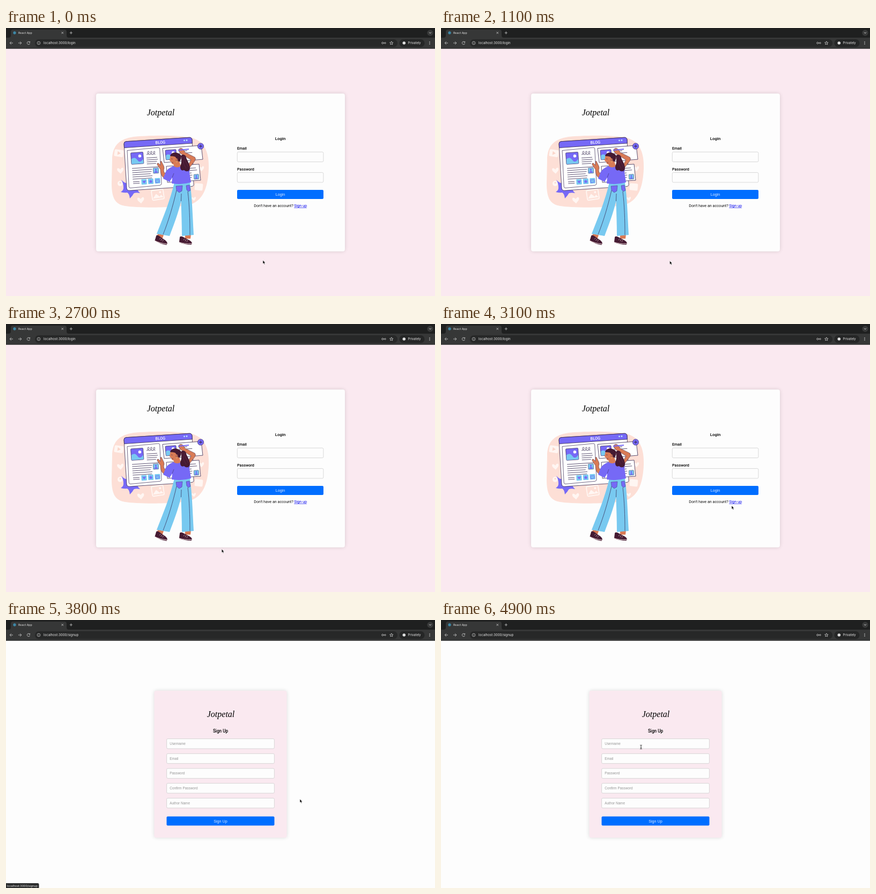
Write an HTML page with a canvas that moves like this. It is 800 px wide and 500 px high and loops after 5000 ms.

```html
<!DOCTYPE html>
<html lang="en">
<head>
<meta charset="utf-8">
<title>Login and sign up</title>
<style>
html, body { margin: 0; width: 100%; height: 100%; overflow: hidden; background: #fdfdfd; }
canvas { display: block; width: 800px; height: 500px; }
</style>
</head>
<body>
<canvas id="stage"></canvas>
<script>
const LOOP = 5000, STEP = 100, SIGNUP_AT = 3800;
const BRAND = 'Jotpetal';
const UI = 'Inter, "Open Sans", sans-serif';
const BODY = 'Roboto, sans-serif';
const FIELD = '"Liberation Sans", Arial, sans-serif';
const SCRIPT = '"Liberation Serif", serif';
const PINK = '#fae9f0', WHITE = '#fdfdfd', BLUE = '#006eff';
const INK = '#34264f', VIOLET = '#7669f6', SKY = '#78c9f0', SKIN = '#d97b56', HAIR = '#451a32';

const canvas = document.getElementById('stage');
const ctx = canvas.getContext('2d');
const ratio = window.devicePixelRatio || 1;
canvas.width = 800 * ratio;
canvas.height = 500 * ratio;
ctx.scale(ratio, ratio);

function shape(d, fill, stroke, width = 0.8) {
  const path = new Path2D(d);
  if (fill) { ctx.fillStyle = fill; ctx.fill(path); }
  if (stroke) { ctx.strokeStyle = stroke; ctx.lineWidth = width; ctx.stroke(path); }
}

function box(x, y, w, h, r, fill, stroke, width = 0.7) {
  ctx.beginPath();
  ctx.roundRect(x, y, w, h, r);
  if (fill) { ctx.fillStyle = fill; ctx.fill(); }
  if (stroke) { ctx.strokeStyle = stroke; ctx.lineWidth = width; ctx.stroke(); }
}

function dot(x, y, r, fill, stroke, width = 0.8) {
  ctx.beginPath();
  ctx.arc(x, y, r, 0, Math.PI * 2);
  if (fill) { ctx.fillStyle = fill; ctx.fill(); }
  if (stroke) { ctx.strokeStyle = stroke; ctx.lineWidth = width; ctx.stroke(); }
}

function text(str, x, y, font, color, align = 'left') {
  ctx.font = font;
  ctx.fillStyle = color;
  ctx.textAlign = align;
  ctx.fillText(str, x, y);
}

function at(x, y, angle, draw) {
  ctx.save();
  ctx.translate(x, y);
  ctx.rotate(angle);
  draw();
  ctx.restore();
}

function card(x, y, w, h, fill) {
  ctx.save();
  ctx.shadowColor = 'rgba(0,0,0,.14)';
  ctx.shadowBlur = 7 * ratio;
  box(x, y, w, h, 4, fill);
  ctx.restore();
}

function brand(x, y) {
  text(BRAND, x, y, `italic 16px ${SCRIPT}`, '#000', 'center');
}

function button(label, x, y, w) {
  box(x, y, w, 17, 2, BLUE);
  text(label, x + w / 2, y + 11.1, `7.2px ${FIELD}`, '#dfeaff', 'center');
}

function browser(path) {
  const light = '#e4e4e4';
  box(0, 0, 800, 39, 0, '#1f2020');
  box(0, 18, 800, 20, 0, '#363737');
  box(0, 38, 800, 1, 0, '#555');
  shape('M5 18Q9 18 9 14V7Q9 3 13 3H109Q113 3 113 7V14Q113 18 117 18Z', '#363737');
  dot(16, 9, 2.7, '#3d87a6');
  text('React App', 23, 11, `5.3px ${UI}`, light);
  shape('M103.5 7.2l3.6 3.6m0-3.6l-3.6 3.6M118.7 9h5.2M121.3 6.4v5.2', null, light, 0.7);
  dot(791, 9, 5.6, '#393a3a');
  shape('M789 8l2 2 2-2', null, light, 0.8);

  box(54, 21, 676, 14.5, 7.2, '#272828');
  box(733.5, 21, 47, 14.5, 7.2, '#252626');
  shape('M13 28H7.3m2.6-2.7L7.2 28l2.7 2.7M23 28h5.7m-2.6-2.7L28.8 28l-2.7 2.7', null, '#d5d5d5', 0.8);
  shape('M44.2 26.4A2.7 2.7 0 1 0 44.6 28.8M44.6 25v2h-2', null, '#d5d5d5', 0.8);
  dot(61, 28, 2.9, null, '#d5d5d5', 0.7);
  shape('M61 27.6v2M61 26.2v.7', null, '#d5d5d5', 0.7);
  text('localhost:3000' + path, 70, 30.3, `6.15px ${UI}`, light);
  dot(702.3, 28, 1.6, null, light, 0.7);
  shape('M704 28h1.8', null, light, 0.7);
  dot(707, 28, 1.3, null, light, 0.6);

  ctx.beginPath();
  for (let i = 0; i < 10; i++) {
    const r = i % 2 ? 1.5 : 3.4, a = i * Math.PI / 5 - Math.PI / 2;
    ctx.lineTo(718.8 + r * Math.cos(a), 28.2 + r * Math.sin(a));
  }
  ctx.closePath();
  ctx.strokeStyle = light;
  ctx.lineWidth = 0.7;
  ctx.stroke();

  dot(742.3, 28, 2.8, '#dedede');
  text('Privately', 749.5, 30.2, `5.9px ${UI}`, light);
  for (const y of [25.8, 28, 30.2]) dot(790, y, 0.7, light);
}

function heart(x, y, s, color) {
  at(x, y, -0.1, () => {
    ctx.scale(s, s);
    shape('M0 1C-1.5-1-3-.9-3 .8C-3 2.5-1 3.6 0 5C1 3.6 3 2.5 3 .8C3-.9 1.5-1 0 1Z', color);
  });
}

function picture(x, y, w, h) {
  at(x, y, -0.07, () => {
    box(0, 0, w, h, 1.2, VIOLET, INK, 0.7);
    dot(w * 0.72, h * 0.32, 2.8, '#fff');
    shape(`M.4 ${h * .55}Q${w * .3} ${h * .3} ${w * .5} ${h * .65}T${w - .4} ${h * .6}V${h - .4}H.4Z`, SKY);
  });
}

function rows(x, y, widths, gap) {
  widths.forEach((w, i) => {
    const top = y + i * gap;
    shape(`M${x + i * .25} ${top}l${w} ${-w * .065}`, null, INK, 0.8);
  });
}

function backdrop() {
  shape('M198 246C198 222 209 207 238 203C265 200 330 199 350 206C372 214 379 235 378 262C377 292 370 320 345 329C325 336 245 336 222 332C204 329 197 318 197 290Z', '#fddfd6');
  at(210, 234, 0.15, () => {
    box(-8, -7, 17, 13, 2, '#fff6f2');
    shape('M-2-4l6 3.5-6 3.5Z', '#fbd6ca');
  });
  heart(213, 262, 2, '#fff6f2');
  heart(251, 317, 2.1, '#fff6f2');
  heart(350, 316, 1.3, '#fff6f2');
  heart(364, 259, 1.7, '#fff6f2');
  at(283, 311, -0.15, () => {
    box(-11, -9, 22, 18, 2, null, '#fff6f2', 1.8);
    shape('M-10 6L-3-2 3 4 6 1 10 6Z', '#fff6f2');
    dot(5, -4, 2, '#fff6f2');
  });
  dot(213, 290, 5, '#fff6f2');
  dot(213, 288.7, 1.5, '#fbd6ca');
  at(360, 296, 0.1, () => box(-8, -6, 15, 13, 2, '#fff6f2'));
}

function blogWindow() {
  shape('M215 283C220 289 224 290 228 289L246 296Q243 302 250 308Q240 306 238 309Q236 313 231 318Q230 309 226 307Q221 308 214 306Q220 302 219 297Q219 290 215 283Z', VIOLET);
  shape('M224 211.7Q220 212 220 216L225 299Q226 303.5 230 303.2L346 295.5Q351 295 350 291L347 208Q346 204 342 204.2Z', '#fff', INK);
  shape('M224 211.7Q220 212 220 216L220.6 223.5L347.3 215L347 208Q346 204 342 204.2Z', VIOLET, INK);
  at(288, 216, -0.067, () => text('BLOG', 0, 0, `500 7.4px ${BODY}`, '#fff', 'center'));
  dot(332.5, 209.8, 1.4, '#bdeaff');
  dot(337, 209.5, 1.4, '#bdeaff');

  shape('M226 228.5L284 223Q286.5 223 286.7 225L290 290Q290 293 287 293.4L232 298.5Q229.5 298.5 229.2 296Z', '#fff', INK, 0.7);
  picture(232.5, 233, 23, 21.5);
  shape('M262 236c5 0 6-6 3.5-6s-2 6 2 6 6-6 3.5-6-2 6 2 6 6-6 3.5-6-2 6 2 5.5', null, INK, 0.8);
  rows(262, 242.5, [20, 21, 19, 17], 3.7);
  rows(235, 262, [50, 37, 36, 34, 37, 36], 4);
  rows(237, 287, [12, 12], 3.2);
  at(279.5, 266, -0.06, () => {
    box(-5, -5, 10, 10, 1, SKY, INK, 0.5);
    dot(0, -1.5, 1.8, VIOLET);
    shape('M-3.5 4Q-3 .8 0 .8T3.5 4Z', VIOLET);
  });
  for (let i = 0; i < 3; i++) {
    at(257.5 + i * 12.5, 287 - i, -0.06, () => box(-5, -5, 10, 10, 1, SKY));
  }
  heart(257.5, 285.2, 0.9, VIOLET);
  shape('M270 282.5l1.2 2.4 2.4.2-1.8 1.8.6 2.6-2.4-1.2-2.3 1.4.4-2.8-1.8-1.6 2.5-.4Z', VIOLET);
  shape('M279 283.5l7-.4.2 4.2-3 .2-2 2-.2-2-2 .1Z', null, VIOLET, 0.9);

  shape('M292 224.5L364 219L367 245L295 251Z', '#fff', INK);
  picture(297, 228, 20, 18);
  rows(322, 230, [16, 25], 4);
  shape('M299 258L360 254L363 284L301 288Z', '#fff', INK);
  rows(338, 262, [16, 18], 4);
  rows(338, 271, [8, 9, 8], 4);
  at(355, 277.5, -0.06, () => {
    box(-4.5, -4.5, 9, 9, 1, SKY, INK, 0.5);
    dot(0, -1.4, 1.6, VIOLET);
    shape('M-3 3.5Q-2.6.7 0 .7T3 3.5Z', VIOLET);
  });
  dot(363, 220.5, 5.7, VIOLET, INK, 0.6);
  shape('M360 220.5h6M363 217.5v6', null, INK, 1);
}

function shoe(x, y, angle) {
  at(x, y, angle, () => {
    shape('M-11-6Q-9-8-5-6L3-2Q11 1 12 5L11 8Q-2 8-12 4Z', HAIR);
    shape('M-12 4Q-3 7 12 6', null, '#f7e6e4', 0.9);
    shape('M-2-3l-2 3M1-2L-1 2M4-.5L2 3', null, '#f7e6e4', 0.6);
  });
}

function woman() {
  shape('M283 384L294 386 291 395 282 391ZM334 385L345 385 344 393 334 393Z', SKIN);
  shoe(290, 395, 0.18);
  shoe(335, 396, 0.03);
  // trousers
  shape('M314 288L343 288C347 315 348 350 350 386L328 388C328 365 327 343 326.5 323C321 346 313 367 305 388L281 384C294 351 306 322 314 288Z', SKY);
  shape('M318 303C311 333 303 360 293 385M339 305C342 330 343 358 343 386M326.5 323L327 309', null, INK, 0.7);
  shape('M317 295L329 294 328 304 323 307 318 303ZM336 294L342 293 344 303 340 305 337 302Z', VIOLET, INK, 0.4);
  // arms
  shape('M295 280C290 277 288 271 288 264L282 255Q281 252 284 252L288 256 288 249Q290 247 291 251L294 257Q296 261 294 265L295 270 305 272 304 284Z', SKIN, INK, 0.5);
  shape('M339 257L345 246 330 237Q323 234 322 227Q325 222 330 226L334 232 352 241Q355 244 352 248L342 261Z', SKIN, INK, 0.5);
  shape('M321 228L341 226', null, VIOLET, 1.8);
  // top
  shape('M311 258Q302 262 298 268L293 281 305 287 310 279 309 290Q327 293 345 288L342 269Q344 262 340 257Q325 255 311 258Z', VIOLET);
  shape('M310 279L313 271M342 269L338 264', null, INK, 0.5);
  // head
  shape('M313 250L323 248 326 258Q319 262 313 258Z', SKIN);
  shape('M306 241Q307 235 314 234Q324 234 324 243Q324 252 317 255Q309 256 308 250L305 247Z', SKIN);
  shape('M306 239C308 231 319 230 326 237Q328 244 323 250L320 247Q321 243 317 243Q318 239 306 239Z', HAIR);
  shape('M326 239C328 234 336 236 336 242C338 248 343 254 343 261C343 268 336 269 332 265C327 268 323 262 326 255C328 250 327 245 326 239Z', HAIR);
  dot(318.5, 246.5, 1.7, SKIN, INK, 0.4);
  dot(318, 249.6, 0.8, '#ffd36b');
  shape('M308 244l2.6.5M309 251q2 .8 3-.4', null, INK, 0.6);
  shape('M329 240Q329 251 336 262M332 239Q333 249 340 259', null, '#6b3150', 0.5);
}

function loginPage() {
  box(0, 39, 800, 461, 0, PINK);
  card(168, 122.3, 464, 294.4, WHITE);
  brand(288.5, 162.5);
  backdrop();
  blogWindow();
  woman();
  text('Login', 511.6, 209.4, `500 8px ${BODY}`, '#000', 'center');
  [['Email', 227, 231.3], ['Password', 265.5, 269.6]].forEach(([label, base, top]) => {
    text(label, 431, base, `500 7.2px ${BODY}`, '#000');
    box(431.3, top, 160.6, 18.4, 2.2, WHITE, '#c9c9c9');
  });
  button('Login', 431, 302, 161);
  text("Don't have an account?", 462.3, 334.3, `7.2px ${BODY}`, '#111');
  text('Sign up', 537.2, 334.3, `7.2px ${BODY}`, '#0000ee');
  box(537.2, 335, 23.6, 0.6, 0, '#0000ee');
}

const FIELDS = ['Username', 'Email', 'Password', 'Confirm Password', 'Author Name'];
const fieldTop = i => 221.6 + i * 27.7;

function signupPage() {
  box(0, 39, 800, 461, 0, WHITE);
  card(276.4, 132, 247.2, 274, PINK);
  brand(400.5, 181);
  text('Sign Up', 400, 210.3, `500 8.2px ${BODY}`, '#000', 'center');
  FIELDS.forEach((label, i) => {
    box(299.6, fieldTop(i), 200.8, 18.4, 2.2, WHITE, '#c9c9c9');
    text(label, 305.3, fieldTop(i) + 11.2, `6.4px ${FIELD}`, '#969696');
  });
  button('Sign Up', 299.5, 366.4, 201);
}

function status() {
  box(-1, 491, 62.5, 10, [0, 2.5, 0, 0], '#2b2c2c');
  text('localhost:3000/signup', 2, 497.6, `5.35px ${UI}`, '#e6e6e6');
}

// time, x, y of the pointer
const TRACK = [
  [0, 479, 433.5], [800, 479, 433.5], [1100, 426.6, 434.6], [1400, 419, 435], [1600, 419, 435],
  [2000, 387, 428.6], [2200, 386, 429.5], [2600, 386, 429.5], [3100, 542, 339], [3200, 543, 338],
  [3500, 548, 334.3], [3800, 548, 334.3], [4400, 429, 373], [4900, 373, 237], [5000, 373, 237]
];

function pointerAt(t) {
  const i = TRACK.findIndex(key => key[0] > t);
  const [t0, x0, y0] = TRACK[i - 1], [t1, x1, y1] = TRACK[i];
  const k = (t - t0) / (t1 - t0), e = k * k * (3 - 2 * k);
  return [x0 + (x1 - x0) * e, y0 + (y1 - y0) * e];
}

function pointerKind(x, y, signup) {
  if (!signup) return x > 537 && x < 561 && y > 326 && y < 336.5 ? 'hand' : 'arrow';
  if (x < 299.5 || x > 500.5) return 'arrow';
  if (y > 366 && y < 384) return 'hand';
  return FIELDS.some((_, i) => y > fieldTop(i) && y < fieldTop(i) + 18.4) ? 'beam' : 'arrow';
}

const POINTERS = {
  arrow: () => shape('M0 0V6.3L1.5 5 2.6 7.5 3.8 7 2.7 4.6H4.6Z', '#000', '#fff', 0.5),
  hand: () => shape('M-.8.6Q0-.4.7.6V3L3 3.4Q4 3.7 3.7 5L3 7.6H-1L-2.8 4.9Q-3 3.8-1.9 4L-.8 5Z', '#fff', '#111', 0.6),
  beam: () => shape('M-1.8-3.7Q0-3.7 0-2.7Q0-3.7 1.8-3.7M0-2.7V2.7M-1.8 3.7Q0 3.7 0 2.7Q0 3.7 1.8 3.7M-.8.9H.8', null, '#111', 0.8)
};

function render(t) {
  const signup = t >= SIGNUP_AT;
  if (signup) signupPage(); else loginPage();
  browser(signup ? '/signup' : '/login');
  if (t >= 3500 && t < 4100) status();
  const [x, y] = pointerAt(t);
  at(x, y, 0, POINTERS[pointerKind(x, y, signup)]);
}

let shown = -1;
const start = performance.now();
function tick() {
  const t = Math.floor((performance.now() - start) % LOOP / STEP) * STEP;
  if (t !== shown) render(shown = t);
  requestAnimationFrame(tick);
}
tick();
</script>
</body>
</html>
```
